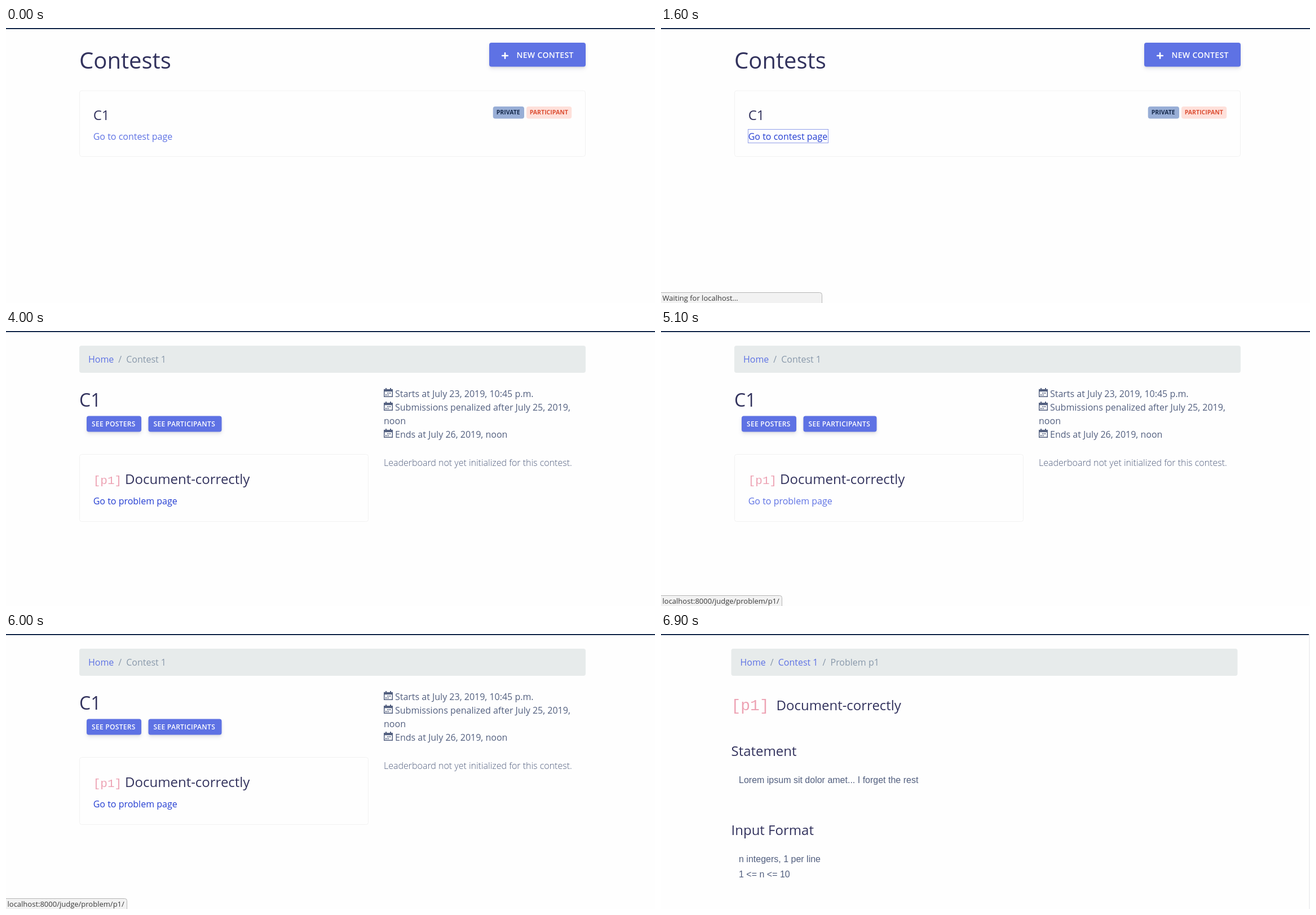
An HTML page that plays this animation: 1151 by 487 pixels, repeating every 8 s.

```html
<!DOCTYPE html>
<html lang="en">
<head>
<meta charset="utf-8">
<title>Contests</title>
<style>
  html, body { margin: 0; width: 100%; height: 100%; overflow: hidden; background: #fefefe; }
  svg { display: block; font: 16px "Open Sans", sans-serif; fill: #525f7f; }
  .title { fill: #32325d; }
  .h1 { font-size: 40px; }
  .h2 { font-size: 32px; }
  .h4 { font-size: 24px; }
  .link { fill: #5e72e4; }
  .link.hover { fill: #233dd2; }
  .muted { fill: #8898aa; }
  .light { font-weight: 300; }
  .code { font-family: "Liberation Mono", monospace; fill: #eda2b3; }
  .sans { font-family: "Liberation Sans", sans-serif; }
  .crumbs { fill: #e7ebeb; }
  .card { fill: none; stroke: #f2f2f2; }
  .button { fill: #5e72e4; filter: drop-shadow(0 4px 3px rgba(50,50,93,.11)) drop-shadow(0 1px 1.5px rgba(0,0,0,.08)); }
  .label { fill: #fff; font-weight: 600; letter-spacing: .025em; }
  .badge { font-size: 10.56px; font-weight: 700; }
  .focus { fill: none; stroke: #233dd2; stroke-dasharray: 1 1; }
  #bubble { font-size: 13px; fill: #3c3c3c; }
  #bubble rect { fill: #f2f2f2; stroke: #b6b6b6; }
</style>
</head>
<body>
<svg width="1151" height="487" viewBox="0 0 1151 487">
  <defs>
    <g id="calendar">
      <path fill="none" stroke="#525f7f" stroke-width="1.5" d="M.75 3h14.5v12.2H.75z"/>
      <path d="M0 2.2h16v4H0zM3 0h2v3H3zM11 0h2v3h-2z"/>
      <path stroke="#525f7f" stroke-width="2" stroke-dasharray="2 1.5" d="M6.5 9h6M3 12.2h6"/>
    </g>
  </defs>
  <rect id="topbar" width="1151" height="2" fill="#172b4d"/>

  <g class="page">
    <text class="title h1" x="130" y="72">Contests</text>
    <rect class="button" x="857" y="26" width="171" height="42.5" rx="4"/>
    <path d="M880.2 49h9.6M885 44.2v9.6" stroke="#fff" stroke-width="2.6" stroke-linecap="round"/>
    <text class="label" x="905.4" y="52.5" font-size="14">NEW CONTEST</text>
    <rect class="card" x="130.5" y="111" width="897" height="116.5" rx="4"/>
    <text class="title h4" x="154.7" y="163">C1</text>
    <text class="link" x="154.7" y="198">Go to contest page</text>
    <rect class="focus" x="154.5" y="179.5" width="142" height="24"/>
    <rect x="863.7" y="139" width="55.3" height="21.5" rx="4" fill="#98aed6"/>
    <text class="badge" x="869.7" y="153.4" style="fill:#172b4d">PRIVATE</text>
    <rect x="923" y="139" width="80.2" height="21.5" rx="4" fill="#fee0da"/>
    <text class="badge" x="928.7" y="153.4" style="fill:#dd5035">PARTICIPANT</text>
  </g>

  <g class="page">
    <rect class="crumbs" x="130" y="26" width="898" height="48" rx="4"/>
    <text class="link" x="146" y="56">Home</text>
    <text class="muted" x="199.3" y="56">/</text>
    <text class="muted" x="213.2" y="56">Contest 1</text>
    <text class="title h2" x="130" y="134.4">C1</text>
    <rect class="button" x="143" y="150.5" width="97" height="28" rx="4"/>
    <text class="label" x="152" y="169" font-size="12">SEE POSTERS</text>
    <rect class="button" x="252.5" y="150.5" width="130" height="28" rx="4"/>
    <text class="label" x="261.5" y="169" font-size="12">SEE PARTICIPANTS</text>
    <rect class="card" x="130.5" y="218.5" width="512" height="119" rx="4"/>
    <text class="code" x="154.7" y="271" font-size="21">[p1]</text>
    <text class="title h4" x="211" y="271">Document-correctly</text>
    <text class="link" x="154.7" y="307">Go to problem page</text>
    <rect class="focus" x="154.5" y="288.5" width="151" height="24"/>
    <use href="#calendar" x="670" y="101"/>
    <text x="690" y="116.5">Starts at July 23, 2019, 10:45 p.m.</text>
    <use href="#calendar" x="670" y="125"/>
    <text x="690" y="140.5">Submissions penalized after July 25, 2019,</text>
    <text x="670" y="164.5">noon</text>
    <use href="#calendar" x="670" y="173"/>
    <text x="690" y="188.5">Ends at July 26, 2019, noon</text>
    <text class="light" x="670" y="238.5">Leaderboard not yet initialized for this contest.</text>
  </g>

  <g class="page">
    <rect x="1149" width="2" height="487" fill="#f0f0f2"/>
    <rect class="crumbs" x="124.5" y="26" width="898" height="48" rx="4"/>
    <text class="link" x="140.5" y="56">Home</text>
    <text class="muted" x="193.8" y="56">/</text>
    <text class="link" x="207.7" y="56">Contest 1</text>
    <text class="muted" x="286.5" y="56">/</text>
    <text class="muted" x="300.5" y="56">Problem p1</text>
    <text class="code" x="124.5" y="135" font-size="28">[p1]</text>
    <text class="title h4" x="204.5" y="134.5">Document-correctly</text>
    <text class="title h4" x="124.5" y="215.5">Statement</text>
    <text class="sans" x="138" y="263.5">Lorem ipsum sit dolor amet... I forget the rest</text>
    <text class="title h4" x="124.5" y="356">Input Format</text>
    <text class="sans" x="138" y="404">n integers, 1 per line</text>
    <text class="sans" x="138" y="431">1 &lt;= n &lt;= 10</text>
  </g>

  <g id="bubble">
    <rect x="-5.5" y="468.5" height="30" rx="4"/>
    <text x="2.5" y="483"></text>
  </g>
</svg>
<script>
const LOOP = 8000;
const all = selector => [...document.querySelectorAll(selector)];
const pages = all('.page');
const links = [pages[0], pages[1]].map(page => page.querySelector('.link:not([y="56"])'));
const outlines = all('.focus');
const bubble = document.getElementById('bubble');
const [bubbleBox, bubbleText] = bubble.children;
const topbar = document.getElementById('topbar');

const show = (node, on) => node.style.display = on ? '' : 'none';
const during = (t, from, to) => t >= from && t < to;

// Two-step fades of the status bubble
const fadeIn = (t, start) => t < start ? 0 : t < start + 100 ? .5 : 1;
const fadeOut = (t, start) => t < start ? 1 : t < start + 100 ? .65 : t < start + 200 ? .3 : 0;

function bubbleState(t) {
  const waiting = 'Waiting for localhost…';
  const problem = 'localhost:8000/judge/problem/p1/';
  if (t < 1600) return [fadeIn(t, 800), 'localhost:8000/judge/contest/1/', 201];
  if (t < 1700) return [1, waiting, 286];
  if (t < 5800) return [fadeIn(t, 4300) * fadeOut(t, 5500), problem, 215];
  if (t < 6400) return [fadeIn(t, 5900), problem, 215];
  if (t < 6900) return [1, waiting, 215 + 71 * Math.min(1, Math.floor((t - 6400) / 100) / 3)];
  return [0, '', 215];
}

function draw(t) {
  const current = t < 1700 ? 0 : t < 6900 ? 1 : 2;
  pages.forEach((page, i) => show(page, i === current));
  topbar.setAttribute('width', current === 2 ? 1149 : 1151);
  links[0].classList.toggle('hover', t >= 400);
  links[1].classList.toggle('hover', during(t, 4000, 5100) || t >= 5600);
  show(outlines[0], t >= 1500);
  show(outlines[1], t >= 6300);
  const [opacity, text, right] = bubbleState(t);
  bubble.style.opacity = opacity;
  bubbleText.textContent = text;
  bubbleBox.setAttribute('width', right + 5);
}

function tick() {
  draw(performance.now() % LOOP);
  requestAnimationFrame(tick);
}
tick();
</script>
</body>
</html>
```
